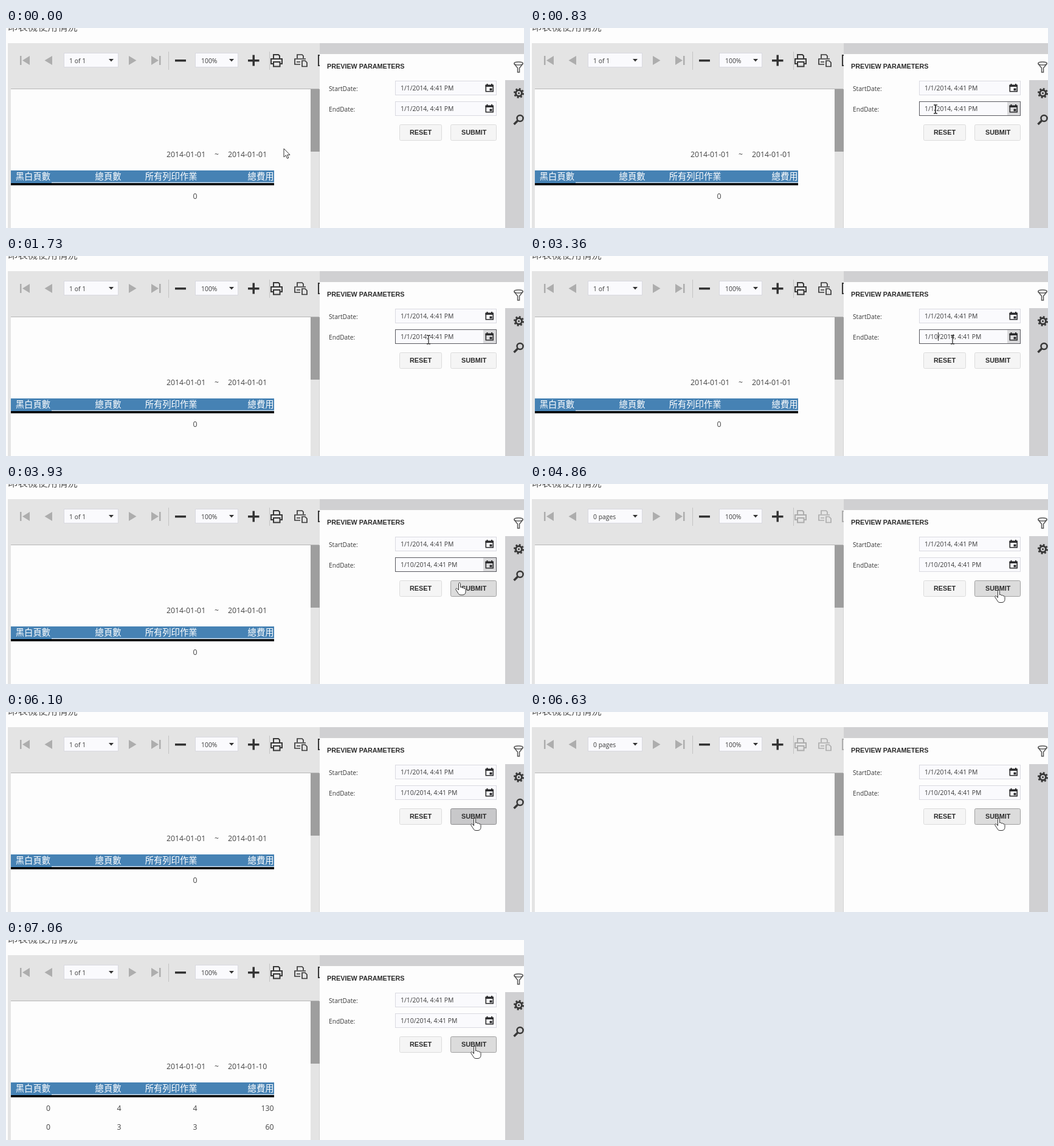
An HTML page for the animation above (8000 ms loop, 852x330 px).

```html
<!DOCTYPE html>
<html lang="zh-Hant">
<head>
<meta charset="utf-8">
<style>
html, body { margin: 0; width: 100%; height: 100%; overflow: hidden; background: #fdfdfd; }
svg { display: block; }
text { font: 10.4px "Open Sans", "Noto Sans", sans-serif; fill: #3a3a3a; white-space: pre; }
.label { font-size: 10.2px; }
.bold { font: bold 10.8px "Liberation Sans", Arial, sans-serif; fill: #2b2b2b; }
.num { font-size: 12.3px; fill: #444; }
.end { text-anchor: end; }
.cjk { font: 14.3px "Noto Sans CJK TC", "Noto Sans CJK", sans-serif; fill: #fff; }
.title { font-size: 16.4px; font-weight: 300; fill: #555; }
.box { fill: #fafafd; stroke: #d9d9e0; }
.button { fill: #f5f5f5; stroke: #dcdcdc; }
.button.hover { fill: #dcdcdc; stroke: #a0a0a0; }
.button.active { fill: #c8c8ca; stroke: #8c8c8e; }
.focus { stroke: #5a5a60; }
.line { fill: none; stroke: currentColor; }
.pointer { fill: #fff; stroke: #333; stroke-linejoin: round; }
#tools { color: #383838; }
#tools.off { color: #adadad; }
</style>
</head>
<body>
<svg width="852" height="330" viewBox="0 0 852 330">
  <defs>
    <g id="calendar" color="#2c2c2e">
      <path class="line" stroke-width="1.6" d="M.8 2.8h11.9v9.9H.8z"/>
      <path fill="currentColor" d="M0 1.5h13.5V5H0zM2 0h2v2H2zM9.5 0h2v2h-2zM7 7.5h4v3.7H7z"/>
    </g>
    <path id="down" fill="#333" d="M0 0h8l-4 4.5z"/>
  </defs>

  <text class="cjk title" x="3" y="4">印表機使用情況</text>

  <!-- toolbar -->
  <path fill="#e4e4e4" d="M3 25h513v305H3z"/>
  <g fill="#adadad">
    <path d="M23 46h2.5v15H23zM39 46v15l-12-7.5zM76 46v15l-12.5-7.5zM202 46v15l12.5-7.5zM239 46v15l12-7.5zM252 46h2.5v15H252z"/>
  </g>
  <path stroke="#c3c3c3" d="M267.5 39v30M433.5 39v30"/>
  <rect class="box" x="95.5" y="41.5" width="89" height="23"/>
  <rect class="box" x="311.5" y="41.5" width="70" height="23"/>
  <use href="#down" x="169" y="51"/>
  <use href="#down" x="367" y="51"/>
  <text id="pages" x="104" y="58"></text>
  <text x="321" y="58">100%</text>
  <path fill="#333" d="M278 52h18v3.5h-18zM398 52h18.5v3.5H398zM405.5 44.5h3.5v18h-3.5z"/>
  <g id="tools">
    <path class="line" stroke-width="2" d="M440 50v-6h8l2 2v4M439 59h-3v-8h18v8h-3M440 56h10.500v7.500H440z"/>
    <path class="line" stroke-width="1.700" d="M479 50v-6h8l2 2v4M484 60h-9v-9h18M478 56h6M487 54h5l3 3v6.500h-8z"/>
    <path class="line" stroke-width="2" d="M516 45h-2v17h2"/>
  </g>

  <!-- report -->
  <path fill="#fdfdfd" d="M8 101h493v229H8z"/>
  <path stroke="#b5b5b5" d="M8 100.500h507"/>
  <path fill="#9e9e9e" d="M501 101h15v103h-15z"/>
  <g id="report">
    <text class="num" x="264" y="213">2014-01-01</text>
    <text class="num" x="343" y="213">~</text>
    <text class="num" id="until" x="365" y="213"></text>
    <path fill="#4682b4" d="M8 235h433v21H8z"/>
    <path fill="#000" d="M8 256h433v3.500H8z"/>
    <path fill="#e8eef4" d="M75 254.500h366v1.200H75z"/>
    <g id="heads"></g>
    <g id="rows"></g>
  </g>

  <!-- parameters -->
  <path fill="#d0d0d2" d="M516 25h336v305H516z"/>
  <path fill="#fdfdfd" d="M516 43h305v287H516zM821 43h31v43h-31z"/>
  <path stroke="#d4d4d4" d="M515.500 204v126"/>
  <text class="bold" x="528" y="67">PREVIEW PARAMETERS</text>
  <text class="label" x="531" y="104">StartDate:</text>
  <text class="label" x="531" y="138">EndDate:</text>
  <rect class="box" x="640.500" y="87.500" width="166" height="23"/>
  <text x="649" y="103">1/1/2014, 4:41 PM</text>
  <use href="#calendar" x="788.500" y="92"/>
  <rect class="box" id="field" x="640.500" y="121.500" width="166" height="23"/>
  <path id="drop" fill="#dadadc" d="M785 122h21v22h-21z"/>
  <text id="date" x="649" y="137"></text>
  <path id="caret" fill="#222" d="M0 126h1v14H0z"/>
  <use href="#calendar" x="788.500" y="126"/>
  <rect class="button" x="647.500" y="159.500" width="69" height="26" rx="2"/>
  <text class="bold" x="664" y="176">RESET</text>
  <rect id="submit" x="731.500" y="159.500" width="75" height="26" rx="2"/>
  <text class="bold" x="749" y="176">SUBMIT</text>

  <!-- side tabs -->
  <g color="#555" stroke-width="1.500">
    <ellipse class="line" cx="843" cy="58.500" rx="7.200" ry="2.500"/>
    <path class="line" d="M835.800 59l5.700 7v7h3v-7l5.700-7"/>
  </g>
  <g color="#383838" stroke-width="3">
    <circle class="line" cx="843.500" cy="107.500" r="7" stroke-dasharray="2.750"/>
    <circle class="line" cx="843.500" cy="107.500" r="5"/>
    <circle cx="843.500" cy="107.500" r="1.500" fill="currentColor"/>
  </g>
  <g id="search" color="#383838">
    <circle class="line" cx="845.500" cy="149" r="5" stroke-width="2.500"/>
    <path class="line" stroke-width="3.500" d="M841.500 153l-6 6"/>
  </g>

  <g id="cursor">
    <path id="arrow" class="pointer" d="M0 0v14l3.300-3 2.300 5.300 2.300-1-2.300-5H10z"/>
    <g id="beam" color="#333"><path class="line" stroke-width="1.300" d="M-3-7h2l1 1 1-1h2M0-6V6M-3 7h2l1-1 1 1h2"/></g>
    <path id="hand" class="pointer" d="M-1.500 1c0-2 3-2 3 0v6c1-1 3-.5 3 1 1-1 3-.5 3 1 1-.7 2.500 0 2.500 1.500v4c0 3-2 5-5 5H2c-3 0-4-2-5-4l-3-4.500c-1-2 1-3 2.500-1.500l2 2z"/>
  </g>
</svg>
<script>
const $ = id => document.getElementById(id);
const show = (id, on) => $(id).style.display = on ? '' : 'none';
const within = (t, a, b) => t >= a && t < b;

const columns = [73, 189.5, 314.5, 440.5];
const line = (cls, y, cells) => cells.map((s, i) =>
  s === '' ? '' : `<text class="${cls} end" x="${columns[i]}" y="${y}">${s}</text>`).join('');
const empty = line('num', 282, ['', '', 0, '']);
const filled = line('num', 282, [0, 4, 4, 130]) + line('num', 312.5, [0, 3, 3, 60]);
$('heads').innerHTML = line('cjk', 249.5, ['黑白頁數', '總頁數', '所有列印作業', '總費用']);

// pointer moves: start, end, target x, target y
const moves = [[200, 630, 667, 134], [1230, 1330, 695, 138], [3660, 4100, 771, 176]];

function pointerAt(t) {
  let x = 457, y = 199;
  for (const [a, b, tx, ty] of moves) {
    const p = Math.min(1, Math.max(0, (t - a) / (b - a)));
    const e = p * p * (3 - 2 * p);
    x += (tx - x) * e;
    y += (ty - y) * e;
  }
  return [x, y];
}

// caret: start, end, x
const carets = [[830, 1230, 666], [1230, 1730, 660], [2300, 2830, 666], [3360, 3860, 671]];

let rowsNow;
function draw(t) {
  const [x, y] = pointerAt(t);
  const inField = within(x, 640, 807) && within(y, 121, 145);
  const onSubmit = within(x, 731, 807) && within(y, 159, 186);
  $('cursor').setAttribute('transform', `translate(${x.toFixed(1)} ${y.toFixed(1)})`);
  show('arrow', !inField && !onSubmit);
  show('beam', inField);
  show('hand', onSubmit);

  const focused = within(t, 830, 4260);
  $('field').setAttribute('class', focused ? 'box focus' : 'box');
  show('drop', focused || inField);
  $('date').textContent = `1/${t < 3360 ? 1 : 10}/2014, 4:41 PM`;
  const caret = carets.find(([a, b]) => within(t, a, b));
  show('caret', caret);
  if (caret) $('caret').setAttribute('transform', `translate(${caret[2]})`);

  const pressed = within(t, 4260, 4600) || within(t, 6100, 6500);
  $('submit').setAttribute('class', 'button' + (pressed ? ' active' : onSubmit ? ' hover' : ''));

  const loading = within(t, 4700, 4960) || within(t, 6560, 6830);
  $('pages').textContent = loading ? '0 pages' : '1 of 1';
  $('tools').setAttribute('class', loading ? 'off' : '');
  show('search', !loading);

  const done = t >= 7060;
  show('report', !within(t, 4860, 5130) && !within(t, 6630, 7060));
  $('until').textContent = done ? '2014-01-10' : '2014-01-01';
  const rows = done ? filled : empty;
  if (rows !== rowsNow) $('rows').innerHTML = rowsNow = rows;
}

const start = performance.now();
function tick() {
  draw((performance.now() - start) % 8000);
  requestAnimationFrame(tick);
}
tick();
</script>
</body>
</html>
```
